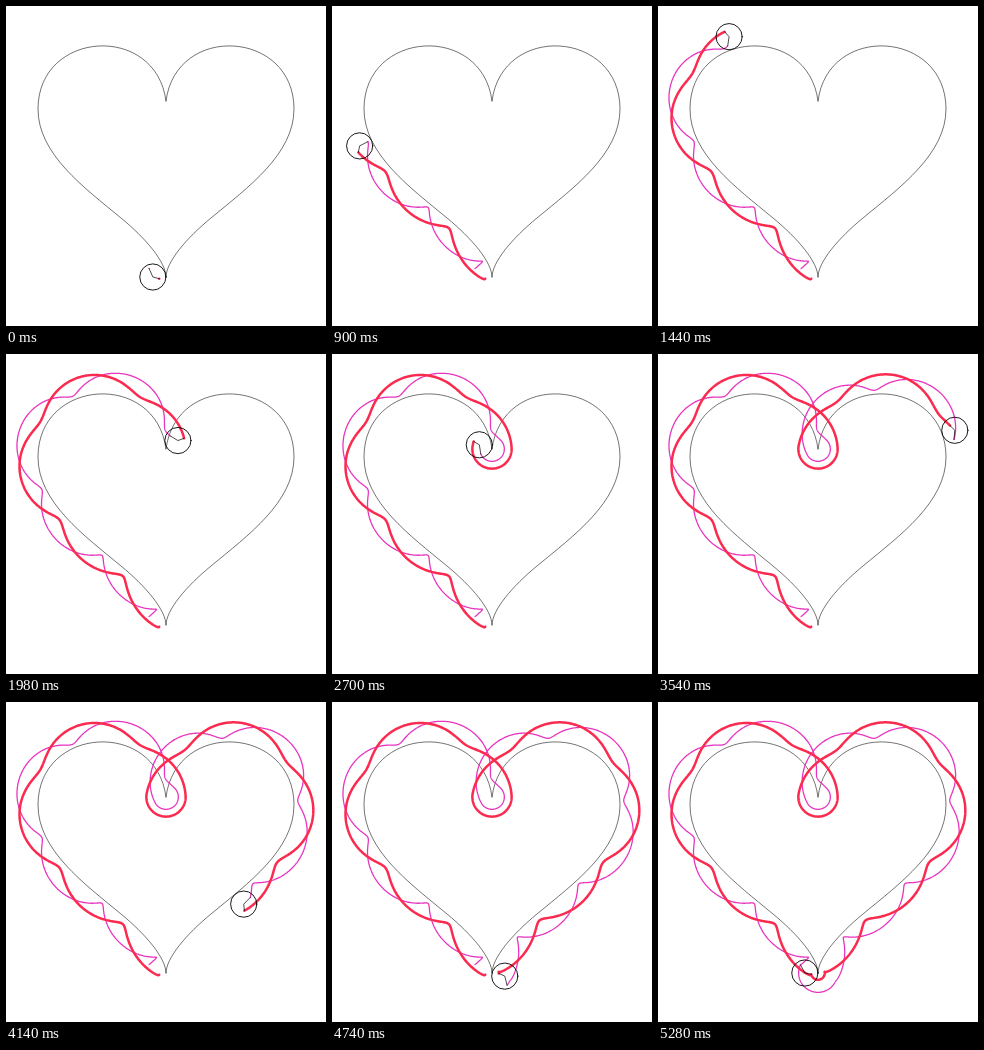
An HTML page for the animation above (5980 ms loop, 320 by 320 pixels).

```html
<!DOCTYPE html>
<html lang="en">
<head>
<meta charset="utf-8">
<title>Rolling circle on a heart</title>
<style>
html, body { margin: 0; width: 100%; height: 100%; overflow: hidden; background: #fff; }
svg { display: block; width: 100%; height: 100%; }
path, circle { fill: none; stroke: #000; stroke-linecap: round; stroke-linejoin: round; }
</style>
</head>
<body>
<svg viewBox="0 0 320 320">
  <path id="heart" stroke-width="0.55"/>
  <path id="pink" style="stroke:#e835c0" stroke-width="1.3"/>
  <path id="red" style="stroke:#fb2b50" stroke-width="2.5"/>
  <circle id="wheel" r="13.1" stroke-width="0.9"/>
  <path id="hands" stroke-width="0.7"/>
</svg>
<script>
const $ = id => document.getElementById(id);
const RAD = Math.PI / 180;
const STEP = 60, LOOP = 5980, LAST = 88;
const R = 13.15;          // wheel radius
const TILT = 7.2 * RAD;   // slope of the outline at the top notch
const SUB = 16;           // trail samples per step

// Left half of the heart, from the bottom tip to the top notch.
// Each curve is passed at an even parameter rate in the given number of steps.
const half = [
  { steps: 7, c: [[160, 271], [160, 256], [139.5, 232.1], [114.9, 211.9]] },
  { steps: 10.6, c: [[114.9, 211.9], [78.1, 181.5], [32, 148], [32, 103]] },
  { steps: 15.8, c: [[32, 103], [32, 24], [160 - 79 * Math.sin(TILT), 95 - 79 * Math.cos(TILT)], [160, 95]] }
];
const SIDE = half.reduce((sum, h) => sum + h.steps, 0);
const TOP_IN = SIDE, TOP_OUT = 44.85, END_IN = TOP_OUT + SIDE;

function bezier(c, t) {
  const s = 1 - t;
  const at = i => s * s * s * c[0][i] + 3 * s * s * t * c[1][i] + 3 * s * t * t * c[2][i] + t * t * t * c[3][i];
  const slope = i => s * s * (c[1][i] - c[0][i]) + 2 * s * t * (c[2][i] - c[1][i]) + t * t * (c[3][i] - c[2][i]);
  return { x: at(0), y: at(1), dx: slope(0), dy: slope(1) };
}

// Contact point and outward normal, k steps after the bottom tip.
function contact(k) {
  let i = 0;
  while (i < 2 && k > half[i].steps) k -= half[i++].steps;
  const p = bezier(half[i].c, Math.min(1, k / half[i].steps));
  const d = Math.hypot(p.dx, p.dy);
  return { x: p.x, y: p.y, nx: p.dy / d, ny: -p.dx / d };
}

// Running length of the left half.
const N = 1000;
const lengths = [0];
for (let i = 1; i <= N; i++) {
  const a = contact((i - 1) / N * SIDE), b = contact(i / N * SIDE);
  lengths.push(lengths[i - 1] + Math.hypot(b.x - a.x, b.y - a.y));
}
const ROLL = lengths[N] / R;
function rolled(k) {
  const q = Math.min(1, Math.max(0, k / SIDE)) * N;
  const i = Math.min(N - 1, Math.floor(q));
  return (lengths[i] + (q - i) * (lengths[i + 1] - lengths[i])) / R;
}

const pivot = (y, a) => ({ x: 160, y, nx: Math.cos(a), ny: Math.sin(a) });

// Wheel centre and turn at step k.
function pose(k) {
  const topTurn = Math.PI + 2 * TILT;
  let c, turn;
  if (k <= TOP_IN) {
    c = contact(k);
    turn = rolled(k);
  } else if (k <= TOP_OUT) {
    const a = topTurn * (k - TOP_IN) / (TOP_OUT - TOP_IN);
    c = pivot(95, a - TILT);
    turn = ROLL + a;
  } else if (k <= END_IN) {
    const left = END_IN - k;
    const m = contact(left);
    c = { x: 320 - m.x, y: m.y, nx: -m.nx, ny: m.ny };
    turn = 2 * ROLL + topTurn - rolled(left);
  } else {
    const a = Math.PI * (k - END_IN) / (LAST - END_IN);
    c = pivot(271, a);
    turn = 2 * ROLL + topTurn + a;
  }
  return { x: c.x + R * c.nx, y: c.y + R * c.ny, turn };
}

const pens = [
  { id: 'red', r: 6.6, start: 15 * RAD },
  { id: 'pink', r: 9.3, start: -114 * RAD }
];
const tip = (pen, p) =>
  (p.x + pen.r * Math.cos(pen.start + p.turn)).toFixed(2) + ' ' +
  (p.y + pen.r * Math.sin(pen.start + p.turn)).toFixed(2);

const poses = Array.from({ length: LAST * SUB + 1 }, (_, i) => pose(i / SUB));
for (const pen of pens) pen.trail = poses.map(p => tip(pen, p));

const outline = flip => half.map(({ c }, i) => {
  const pts = c.map(([x, y]) => (flip ? 320 - x : x) + ' ' + y);
  return (i ? '' : 'M' + pts[0]) + 'C' + pts.slice(1).join(' ');
}).join('');
$('heart').setAttribute('d', outline(false) + outline(true));

let shown = -1;
function draw(ms) {
  const k = Math.min(LAST, Math.floor((ms % LOOP) / STEP));
  if (k === shown) return;
  shown = k;
  const n = k * SUB, p = poses[n];
  for (const pen of pens) {
    $(pen.id).setAttribute('d', 'M' + pen.trail[0] + 'L' + pen.trail.slice(0, n + 1).join('L'));
  }
  $('wheel').setAttribute('cx', p.x);
  $('wheel').setAttribute('cy', p.y);
  $('hands').setAttribute('d', 'M' + pens[0].trail[n] + 'L' + p.x + ' ' + p.y + 'L' + pens[1].trail[n]);
}

const begin = performance.now();
function tick() {
  draw(performance.now() - begin);
  requestAnimationFrame(tick);
}
draw(0);
requestAnimationFrame(tick);
</script>
</body>
</html>
```
